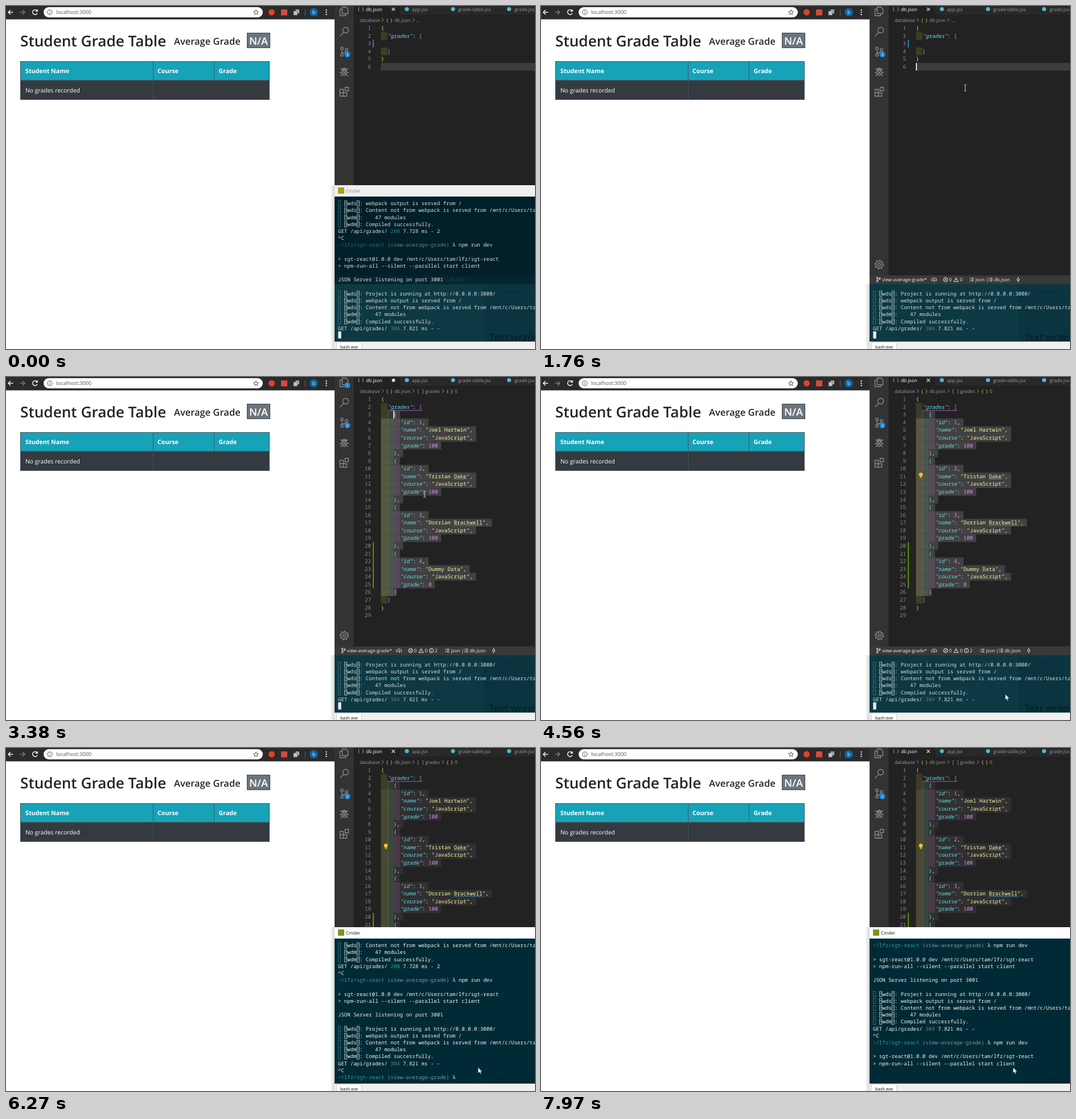
Write an HTML page that moves like this. It is 929 by 603 pixels and loops after 8000 ms.

```html
<!DOCTYPE html>
<html lang="en">
<head>
<meta charset="utf-8">
<title>Student Grade Table</title>
<style>
html, body { margin: 0; width: 100%; height: 100%; overflow: hidden; background: #fff; }
svg { display: block; }
text { font-family: "Open Sans", "Noto Sans", sans-serif; white-space: pre; text-rendering: geometricPrecision; }
.mono { font-family: "Noto Sans Mono", "DejaVu Sans Mono", monospace; }
.line { fill: none; stroke: #8c8c8c; stroke-width: 1.3; }
.key { fill: #66d9ef; font-style: italic; }
.str { fill: #fbf3a0; }
.num { fill: #d98cf5; }
.d0 { fill: #f0cf4a; } .d1 { fill: #c586e8; } .d2 { fill: #8fc8ee; }
.out { fill: #f2f2ec; } .dir { fill: #2aa198; } .branch { fill: #839496; }
.ok { fill: #2aa5a0; } .same { fill: #657b83; }
.idle .out { fill: #d9deda; } .idle .dir { fill: #256c7c; } .idle .branch { fill: #6b7f85; }
.idle .ok { fill: #2b7f9b; }
</style>
</head>
<body>
<svg id="stage" width="929" height="603" viewBox="0 0 929 603"></svg>
<script>
(() => {
'use strict';
const LOOP = 8000;
const UNDO1 = 2210, UNDO2 = 3000, SAVE = 4160, TO_EDITOR = 1670, TO_SHELL = 4940;

const text = (x, y, s, size, fill, extra = '') =>
  `<text x="${x}" y="${y}" font-size="${size}" fill="${fill}" ${extra}>${s}</text>`;
const rect = (x, y, w, h, fill, extra = '') =>
  `<rect x="${x}" y="${y}" width="${w}" height="${h}" fill="${fill}" ${extra}/>`;
const disc = (x, y, r, fill, extra = '') =>
  `<circle cx="${x}" cy="${y}" r="${r}" fill="${fill}" ${extra}/>`;
const path = (d, stroke, width = 1.3, fill = 'none') =>
  `<path d="${d}" stroke="${stroke}" stroke-width="${width}" fill="${fill}"/>`;
const group = (id, body) => `<g id="${id}">${body}</g>`;

// ---------- browser ----------
function browser() {
  const semi = 'font-weight="600"', bold = 'font-weight="700"';
  const edge = '#45545e';
  let star = '';
  for (let i = 0; i < 10; i++) {
    const r = i % 2 ? 2 : 4.6, a = i * Math.PI / 5 - Math.PI / 2;
    star += (i ? 'L' : 'M') + (439 + r * Math.cos(a)).toFixed(1) + ' ' + (11.3 + r * Math.sin(a)).toFixed(1);
  }
  return rect(0, 0, 577, 603, '#fff') + rect(0, 0, 577, 23.5, '#2b2b2b')
    + path('M12.5 11H4M8 7L4 11L8 15', '#f1f1f1', 1.5)
    + path('M24.5 11H33M29 7L33 11L29 15', '#777', 1.5)
    + path('M54.3 8A4.3 4.3 0 1 0 55 12.5M55.2 6V9.3H51.8', '#f1f1f1', 1.5)
    + rect(66, 2, 385, 18, '#fff', 'rx="9"')
    + disc(77, 11, 4.2, 'none', 'stroke="#555"') + path('M77 10.3V13.4M77 8.4V9.4', '#555', 1)
    + text(88, 14.2, 'localhost:3000', 9.2, '#555')
    + path(star + 'Z', '#555', 1)
    + disc(466.5, 11, 5.5, '#e0412c') + rect(483, 6, 11, 10.5, '#d64a3c')
    + rect(508.5, 6, 6.5, 7, '#a5a5a0') + rect(505, 9, 6.5, 7, '#c6c6be', 'stroke="#777" stroke-width=".7"')
    + rect(525, 6, 1, 11, '#666')
    + disc(540.5, 11, 7.3, '#0b67a5') + text(540.5, 14, 'b', 8.5, '#fff', 'text-anchor="middle"')
    + [7, 11, 15].map(y => disc(562.5, y, 1.2, '#eee')).join('')
    + text(25, 71, 'Student Grade Table', 26.2, '#212529', semi)
    + text(295, 68, 'Average Grade', 16.5, '#212529', semi)
    + rect(423.5, 47.5, 40, 26, '#6c757d', 'stroke="#3c444c"')
    + text(443.5, 67.5, 'N/A', 18, '#fff', semi + ' text-anchor="middle"')
    + rect(25.5, 97.5, 437, 33, '#17a2b8', `stroke="${edge}"`)
    + rect(25.5, 131, 437, 33.5, '#343a40', `stroke="${edge}"`)
    + rect(258, 97, 1, 68, edge) + rect(365, 97, 1, 34, edge)
    + text(34, 118, 'Student Name', 10.7, '#fff', bold)
    + text(266, 118, 'Course', 10.7, '#fff', bold)
    + text(373.5, 118, 'Grade', 10.7, '#fff', bold)
    + text(34, 152, 'No grades recorded', 10.4, '#fff');
}

// ---------- editor ----------
const X0 = 658.5, CW = 5.57, ROW = 13.57, MONO = CW / 0.6;
const colX = c => X0 + c * CW;
const rowY = n => 32.2 + (n - 1) * ROW;
const people = [['Joel Hartwin', 100], ['Tristan Oake', 100], ['Dorrian Brackwell', 100], ['Dummy Data', 0]];
const fullDoc = ['{', '  "grades": ['];
people.forEach(([name, grade], i) => fullDoc.push('    {', `      "id": ${i + 1},`, `      "name": "${name}",`,
  '      "course": "JavaScript",', `      "grade": ${grade}`, i < 3 ? '    },' : '    }'));
fullDoc.push('  ]', '}', '');
const emptyDoc = ['{', '  "grades": [', '', '  ]', '}', ''];
const indent = s => s.length - s.trimStart().length;

function codeLine(s, n) {
  const pad = indent(s);
  const body = s.trim().replace(/("[^"]*")(?=:)|"[^"]*"|\d+|[{}\[\]]/g, (m, key) => {
    const cls = key ? 'key' : m[0] === '"' ? 'str' : /\d/.test(m) ? 'num' : 'd' + (/[\[\]]/.test(m) ? 1 : pad / 2);
    return `<tspan class="${cls}">${m}</tspan>`;
  });
  return text(641, rowY(n) + 10, n, MONO, '#8a8a8a', 'class="mono" text-anchor="end"')
    + text(colX(pad), rowY(n) + 10, body, MONO, '#e8e8e8', 'class="mono"');
}
const tints = ['#ffff40', '#7fff7f', '#ff7fff'];
function rainbow(s, n) {
  let out = '';
  for (let k = 0; k < indent(s) / 2; k++)
    out += rect(colX(2 * k), rowY(n), 2 * CW, ROW, tints[k], 'fill-opacity=".12"');
  return out;
}
const each = (doc, f) => doc.map((s, i) => f(s, i + 1)).join('');

function selection() {
  let out = '';
  for (let n = 3; n <= 26; n++) {
    const s = fullDoc[n - 1], from = n === 3 ? 4 : 0;
    const to = s.length + (n < 26 ? 1 : 0);
    out += rect(colX(from), rowY(n), (to - from) * CW, ROW + .1, 'currentColor');
  }
  return out;
}
function dots() {
  return each(fullDoc, (s, n) => n > 3 && n < 27
    ? text(X0, rowY(n) + 10, '·'.repeat(indent(s)), MONO, '#fff', 'class="mono" opacity=".16"') : '');
}
function squiggle(n, word) {
  const x = colX(fullDoc[n - 1].indexOf(word));
  let d = `M${x} ${rowY(n) + 12.2}`;
  for (let i = 0; i < word.length * 2; i++) d += `l${CW / 2} ${i % 2 ? 1.6 : -1.6}`;
  return path(d, '#4aa3df', .9);
}
const badge = (x, y, s) => disc(x, y, 5.2, '#1683d8') + text(x, y + 2.5, s, 7, '#fff', 'text-anchor="middle"');
const braces = (x, y) => text(x, y, '{ }', 8.2, '#e2c35a', 'class="mono" letter-spacing="-1.2"');

function gear(cx, cy) {
  let d = '';
  for (let i = 0; i < 32; i++) {
    const a = (i + .5) * Math.PI / 16, r = i % 4 < 2 ? 7.6 : 5.4;
    d += (i ? 'L' : 'M') + (cx + r * Math.cos(a)).toFixed(1) + ' ' + (cy + r * Math.sin(a)).toFixed(1);
  }
  return path(d + 'Z', '#8c8c8c') + disc(cx, cy, 2.3, 'none', 'class="line"');
}
function activityBar() {
  const l = d => `<path class="line" d="${d}"/>`;
  const ring = (x, y, r) => disc(x, y, r, 'none', 'class="line"');
  return rect(577, 0, 33.5, 489, '#333')
    + l('M590.5 2H597L600.5 5.5V13.5H590.5ZM590.5 5.5H586.5V17H596.5V13.5')
    + ring(596.5, 42.5, 5) + l('M593 46.5L586.5 53')
    + ring(590, 74.5, 2.3) + ring(598, 77, 2.3) + ring(590, 86, 2.3)
    + l('M590 77V83.5M598 79.5C598 82.5 591 81 590 83.5')
    + badge(599.5, 85, 3)
    + '<ellipse class="line" cx="594" cy="116.5" rx="4" ry="5.5"/>'
    + l('M591 112.5C591 108 597 108 597 112.5M590 113H598M586 117H590M598 117H602M587.5 109.5L590.5 113M600.5 109.5L597.5 113M587.5 123L591 120M600.5 123L597 120M591.5 114.5L596.5 120M596.5 114.5L591.5 120')
    + l('M586.5 146.5H592.5V152.5H598.5V158.5H586.5ZM586.5 152.5H592.5V158.5M595.5 143H601.5V149H595.5Z')
    + gear(594, 454.5);
}
function statusBar() {
  const w = '#f0f0f0';
  const ring = (x, y, r) => disc(x, y, r, 'none', `stroke="${w}"`);
  const list = x => path([478.5, 481, 483.5].map(y => `M${x} ${y}h1.3m1.2 0h4.5`).join(''), w, 1.1);
  const label = (x, s) => text(x, 484.2, s, 8.2, w);
  return rect(577, 473.5, 352, 15.5, '#393939')
    + ring(590.5, 478, 1.3) + ring(590.5, 484, 1.3) + ring(594.8, 479, 1.3)
    + path('M590.5 479.5V482.5M594.8 480.3C594.5 482 591 481 590.5 482.5', w, .9)
    + label(599, 'view-average-grade*')
    + path('M688 483.5H687.5A2 2 0 0 1 687.5 479.5A3 3 0 0 1 692.5 479.2A2.1 2.1 0 0 1 693 483.5H692.5M690.3 485V481M688.8 482.3L690.3 480.7L691.8 482.3', w, 1)
    + path('M708.8 479.3L712.2 482.7M712.2 479.3L708.8 482.7', w, .9) + ring(710.5, 481, 3.7) + label(716.5, '0')
    + path('M729 477.5L733 484.5H725ZM729 480V482.3', w, .9) + label(735.5, '0')
    + group('hints', ring(747, 481, 3.7) + path('M747 480.5V483.2M747 478.5V479.6', w, .9) + label(753, '2'))
    + group('tail', list(753) + label(763, 'json |') + list(786) + label(795.5, 'db.json')
      + ring(838, 481, 2) + path('M838 476.5V479M838 483V485.5', w, 1));
}
function editor() {
  const dim = '#9a9a9a', gap = x => path(`M${x} 21.5L${x + 3} 24.5L${x} 27.5`, dim, 1);
  const dot = x => disc(x, 5.5, 3.6, '#4fb8d8');
  const scope = rect(670, rowY(3) - 1, 61, 1, '#b05ab8');
  const mark = (n, c) => rect(colX(c) - .3, rowY(n) + .5, 5.5, ROW - 1, '#9995', 'stroke="#9a9a9a" stroke-width=".8"');
  return rect(577, 0, 352, 489, '#222')
    + rect(610.5, 0, 319, 15, '#292929')
    + rect(611, 0, 80, 15, '#222') + [691, 772, 871].map(x => rect(x, 0, 1, 15, '#222')).join('')
    + braces(617, 8.4) + text(632, 9, 'db.json', 8.3, '#fff')
    + group('close', path('M677.5 3L683 8.5M683 3L677.5 8.5', '#ddd', 1.1))
    + group('dirty', disc(680.5, 5.7, 2.9, '#ddd'))
    + dot(704) + text(713, 9, 'app.jsx', 8.4, dim)
    + dot(785) + text(794, 9, 'grade-table.jsx', 8.4, dim)
    + dot(883.5) + text(893, 9, 'grade.jsx', 8.4, dim)
    + text(621, 27.5, 'database', 8.3, dim) + gap(660) + braces(667, 27.5) + text(682, 27.5, 'db.json', 8.3, dim) + gap(714)
    + group('crumb0', text(721, 27.5, '...', 8.3, dim))
    + group('crumb1', text(721, 27.5, '[ ]', 8.3, dim, 'class="mono" letter-spacing="-.5"') + text(736, 27.5, 'grades', 8.3, dim))
    + group('crumb2', gap(766) + braces(773, 27.5) + text(788, 27.5, '0', 8.3, dim))
    + group('doc0',
      rect(X0, rowY(6), 271, ROW, '#3c3c3c', 'id="row6"')
      + group('row3', rect(X0, rowY(3), 271, ROW, '#3c3c3c') + rainbow('    ', 3) + scope + mark(2, 12) + mark(4, 2))
      + each(emptyDoc, rainbow) + rect(644, rowY(3), 2, ROW, '#1b81a8') + each(emptyDoc, codeLine))
    + group('doc1',
      group('sel', selection()) + each(fullDoc, rainbow) + group('dots', dots())
      + scope + rect(670, rowY(3), 1, 24 * ROW, '#b05ab8', 'opacity=".45"')
      + rect(644, rowY(20), 2, 6 * ROW, '#5c8a12') + each(fullDoc, codeLine)
      + squiggle(11, 'Oake') + squiggle(17, 'Brackwell'))
    + group('bulb', disc(667, 171.5, 3.2, '#ffca1a') + rect(665.5, 174, 3, 3.4, '#e8b010'))
    + rect(0, 0, 1.6, ROW, '#fff', 'id="caret"')
    + activityBar() + group('unsaved', badge(599.5, 14.5, 1)) + statusBar();
}

// ---------- terminal ----------
const TX = 583, TW = 5.43, TROW = 12.2;
function shellLine(parts, i) {
  const y = 341 + i * TROW;
  let col = 0;
  return parts.map(([s, cls]) => {
    const x = TX + col * TW;
    col += s.length;
    if (cls === 'sign')
      return rect(x + .6, y + 1.6, 4.2, 9.2, 'none', `stroke="${s === '?' ? '#c9d2d0' : '#3f7a86'}" stroke-width=".8"`)
        + (s === '?' ? text(x + 1.2, y + 9, '?', 7, '#c9d2d0') : '');
    const safe = s.replace('>', '&gt;');
    return `<text class="mono ${cls}" x="${x}" y="${y + 9.2}" font-size="${TW / 0.6}">${safe}</text>`;
  }).join('');
}
const out = s => [[s, 'out']];
const log = (tag, s) => [['i', 'sign'], [' ', 'out'], ['?', 'sign'], [tag, 'out'], ['?', 'sign'], [': ' + s, 'out']];
const get = (code, cls, s) => [['GET /api/grades/ ', 'out'], [code, cls], [s, 'out']];
const prompt = s => [['~/lfz/sgt-react ', 'dir'], ['(view-average-grade) ', 'branch'], ['λ ' + s, 'out']];
const served = [
  log('wds', 'webpack output is served from /'),
  log('wds', 'Content not from webpack is served from /mnt/c/Users/tam/lfz/sgt-react'),
  log('wdm', '   47 modules'),
  log('wdm', 'Compiled successfully.')];
const launch = [out(''), out('> sgt-react@1.0.0 dev /mnt/c/Users/tam/lfz/sgt-react'),
  out('> npm-run-all --silent --parallel start client'), out('')];
const history = [...served, get('200', 'ok', ' 7.728 ms - 2'), out('^C'), prompt('npm run dev'), ...launch,
  out('JSON Server listening on port 3001'), out(''), log('wds', 'Project is running at http://0.0.0.0:3000/'),
  ...served, get('304', 'same', ' 7.821 ms - -')];

function terminal() {
  return rect(569, 315, 8, 288, 'url(#fade)')
    + rect(577, 315, 352, 20, '#f0f0f0', 'id="bar"')
    + rect(583, 319, 11, 11, '#a3a51c', 'id="logo"') + text(597, 327.6, 'Cmder', 8, '#888', 'id="name"')
    + rect(577, 335, 352, 255, '#002b36')
    + group('glass', rect(577, 335, 352, 255, '#012029') + rect(577, 474, 352, 15, '#05262f')
      + text(753, 484.2, 'json | db.json', 8.2, '#24414a')
      + rect(577, 489, 352, 101, '#0c3944') + rect(838, 489, 91, 101, '#0a3540')
      + rect(864, 511, 65, 1, '#0b2d36') + text(865, 505, 'ng class="ta', 8, '#0b2a33'))
    + text(849, 588, 'Text wrapping', 16.5, '#021d26', 'font-weight="600" id="ghost"')
    + '<g clip-path="url(#rows)">' + group('lines', history.map(shellLine).join('')
      + group('stop', shellLine(out('^C'), 19)) + group('again', shellLine(prompt(''), 20))
      + group('typed', shellLine([[' '.repeat(39), 'out'], ['npm run dev', 'out']], 20))
      + group('run', launch.map((p, i) => shellLine(p, 21 + i)).join(''))) + '</g>'
    + rect(0, 572, 1.5, 12.5, '#e8ecec', 'id="bash"')
    + rect(577, 590, 352, 13, '#f0f0f0') + rect(580.5, 591.5, 44, 13, '#fff', 'stroke="#c8c8c8" stroke-width=".8"')
    + text(587, 601.7, 'bash.exe', 7.5, '#111');
}

document.getElementById('stage').innerHTML = `<defs>
  <linearGradient id="fade"><stop stop-opacity="0"/><stop offset="1" stop-opacity=".16"/></linearGradient>
  <clipPath id="rows"><rect x="577" y="341" width="352" height="249"/></clipPath>
  <clipPath id="below"><rect x="560" y="489" width="369" height="114"/></clipPath></defs>`
  + browser() + editor() + group('term', terminal())
  + disc(0, 0, 8, '#a3ad12', 'id="click" opacity=".9"')
  + group('beam', path('M-2.5 -5.5C-1 -5.5 0 -5 0 -4.5C0 -5 1 -5.5 2.5 -5.5M0 -4.5V4.5M-2.5 5.5C-1 5.5 0 5 0 4.5C0 5 1 5.5 2.5 5.5', '#d8d8d8', 1))
  + group('arrow', path('M0 0V10.2L2.4 8L4 11.8L5.8 11L4.2 7.4H7.4Z', '#222', .7, '#fff'));

// ---------- time ----------
const parts = Object.fromEntries([...document.querySelectorAll('[id]')].map(e => [e.id, e]));
const show = (id, on) => { parts[id].style.display = on ? '' : 'none'; };
const set = (id, name, v) => parts[id].setAttribute(name, v);
const put = (id, x, y) => set(id, 'transform', `translate(${x} ${y})`);
const within = (t, a, b) => t >= a && t < b;

// first time, last time, steps, x and y reached
const moves = [[670, 1290, 9, 706, 227], [1440, 1610, 3, 745, 144], [2130, 2600, 7, 734, 167],
  [3080, 3380, 5, 735, 206], [3460, 3690, 4, 806, 555], [4480, 4790, 5, 829, 561.5]];
function pointer(t) {
  let x = 868, y = 612;
  for (const [a, b, n, tx, ty] of moves) {
    if (t < a) break;
    const p = Math.min(1, (Math.floor((t - a) / (b - a) * (n - 1) + 1e-6) + 1) / n);
    x += (tx - x) * p;
    y += (ty - y) * p;
  }
  return [x, y];
}

function render(t) {
  const front = within(t, TO_EDITOR, TO_SHELL), active = t >= TO_SHELL;
  const full = t >= UNDO2, unsaved = within(t, UNDO1, SAVE);

  show('close', !unsaved); show('dirty', unsaved); show('unsaved', unsaved);
  show('crumb0', t < UNDO1); show('crumb1', t >= UNDO1); show('crumb2', full);
  show('doc0', !full); show('doc1', full);
  show('row6', t < UNDO1); show('row3', t >= UNDO1);
  show('bulb', t >= SAVE); show('hints', full); show('dots', !active);
  put('tail', full ? 18.5 : 0, 0);
  set('sel', 'color', active ? '#303030' : '#414141');

  const first = within(t, TO_EDITOR, 2170);
  show('caret', first || within(t, UNDO1, 2680) || within(t, UNDO2, 3510) || within(t, 4010, 4480));
  put('caret', first ? X0 : colX(4) - .5, rowY(first ? 6 : 3));

  set('term', 'clip-path', front ? 'url(#below)' : 'none');
  set('term', 'class', active ? '' : 'idle');
  set('bar', 'fill', active ? '#fff' : '#f0f0f0');
  set('name', 'fill', active ? '#111' : '#888');
  set('logo', 'fill', active ? '#7c9427' : '#a3a51c');
  set('ghost', 'opacity', active ? .45 : .9);
  show('glass', !active);

  const scroll = t < 5730 ? 0 : t < 7430 ? 1 : t < 7810 ? 2 : 6;
  put('lines', 0, -scroll * TROW);
  show('stop', t >= 5640); show('again', t >= 5730); show('typed', t >= 7030); show('run', t >= 7810);

  const col = within(t, 5640, 5730) ? 2 : within(t, 5730, 7030) ? 39 : within(t, 7030, 7430) ? 50 : 0;
  show('bash', !within(t, 5490, 5640) && !within(t, 6270, 6800) && t < 7970);
  put('bash', TX + col * TW + .3, 0);
  set('bash', 'width', active ? 1.4 : 5.4);

  const [x, y] = pointer(t), overCode = y < 315 || (front && y < 474);
  const seen = !within(t, 2680, 2830);
  show('beam', seen && overCode); show('arrow', seen && !overCode);
  put('beam', x, y); put('arrow', x, y);
  show('click', within(t, TO_EDITOR, 1760) || within(t, TO_SHELL, 5030));
  put('click', x - 1.5, y);
}

function tick() {
  render(performance.now() % LOOP);
  requestAnimationFrame(tick);
}
tick();
})();
</script>
</body>
</html>
```
